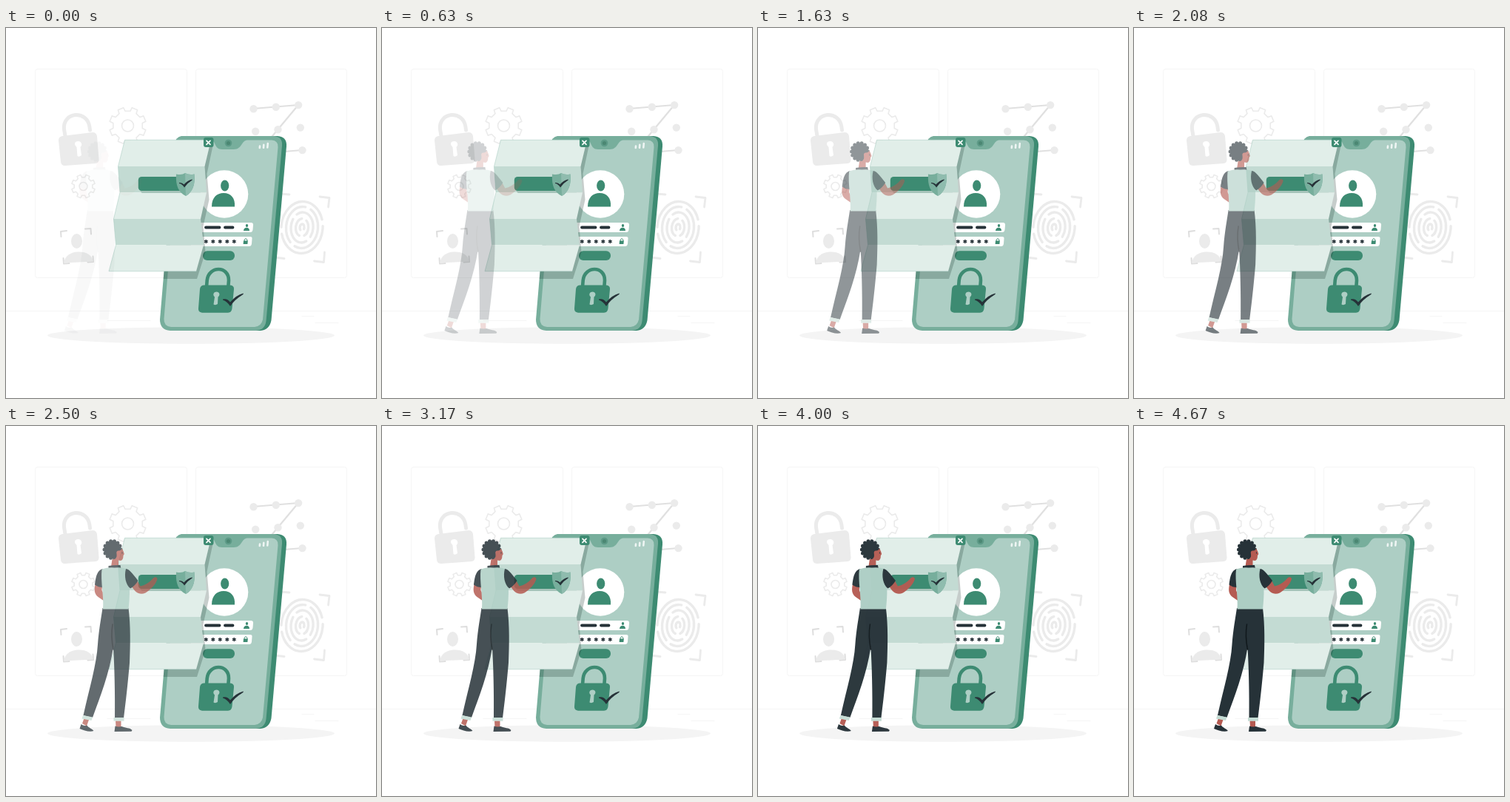
Recreate the animation shown at these times as an HTML page. Size 500 px wide and 500 px high, loop 4.71 s.

```html
<!DOCTYPE html>
<html lang="en">
<head>
<meta charset="utf-8">
<title>Secure login</title>
<style>
  html, body { margin: 0; width: 100%; height: 100%; overflow: hidden; background: #fff; }
  svg { display: block; width: 100%; height: 100%; }
  .line { fill: none; stroke-linecap: round; stroke-linejoin: round; }
  .dark { fill: #263238; }
  .green { fill: #3d8b72; }
  .mid { fill: #77ae9c; }
  .soft { fill: #adcec4; }
  .skin { fill: #b55b52; }
  .grey { fill: #ebebeb; }
</style>
</head>
<body>
<svg viewBox="0 0 500 500">
  <defs>
    <path id="face" d="M237 146H362Q374 147 373 159L351.500 396Q350 408 338 409H222Q208 408 208 394L228 158Q229 147 237 146Z"/>
    <clipPath id="onPhone"><use href="#face"/></clipPath>
  </defs>

  <g class="line" stroke="#f5f5f5">
    <rect x="39.500" y="55.500" width="205" height="282" rx="3"/>
    <rect x="256.500" y="55.500" width="204" height="282" rx="3"/>
    <path d="M0 382.500H500M400 389.500h16M418 398.500h31M137 395.500h58"/>
  </g>
  <ellipse cx="250" cy="415.500" rx="194" ry="11.300" fill="#f4f4f4"/>

  <!-- pale padlock and gears -->
  <path class="line" stroke="#ebebeb" stroke-width="5" d="M80 146L78.500 137C76 113 110 110 113 134L113.500 138"/>
  <path class="grey" d="M76 146L117 141Q122 141 123 146L125.500 177Q126 182 121 183L80 186Q75 186.500 74 181L71 152Q71 147 76 146Z"/>
  <path fill="#fff" d="M95.500 161C91 157 93 153 97.500 153C102 153 104 158 100.500 161L102 172Q99 175 96.500 173Z"/>
  <g id="gears" class="line" stroke="#ebebeb" stroke-width="1.600"></g>

  <!-- face scan -->
  <path class="line" stroke="#dedede" stroke-width="2" d="M74.500 282L74 275L82 274M107 271.500L114.500 271L115 278.500M77.500 311L78 318.500L85.500 318M110.500 316.500L118 316L117.500 308.500"/>
  <ellipse class="grey" cx="95.500" cy="288" rx="7.500" ry="10"/>
  <path class="grey" d="M78 317.500C80 307 88 303 97 302.500C108 302 116 306 118 315.500Z"/>

  <!-- unlock pattern -->
  <path class="line" stroke="#e0e0e0" stroke-width="2.200" d="M334 109L395 104L340 170L400 165"/>
  <g id="dots" class="grey"></g>

  <!-- fingerprint -->
  <g class="line" stroke="#ebebeb" stroke-width="2.800">
    <path d="M369 235L370 224L383 225M424 228L437 229.500L435.500 242M430.500 303L429.500 316.500L416.500 315M376 311.500L363 310"/>
    <g id="print" transform="rotate(5 400 270)" stroke-width="3.400"></g>
  </g>

  <!-- phone -->
  <path class="green" d="M243 146H367Q380 147 379 160L358.500 395Q356 408 344 409H225Z"/>
  <use href="#face" class="mid"/>
  <path class="soft" d="M240 151.500H277C284 152 281 164 292 164H308C319 164 318 152 326 151.500H359Q368 152 367.500 161L347 394Q345 403 336 404H223Q213 403 213.500 393L233 160Q234 152 240 151.500Z"/>
  <circle cx="300.500" cy="155.500" r="4.800" fill="#5d9a87"/>
  <circle cx="300.500" cy="155.500" r="2.600" fill="#4b8773"/>
  <path class="line" stroke="#eef5f3" stroke-width="2.600" d="M343 159.500l-.2 2.500M348.300 157.800l-.3 4M353.800 156l-.5 5.500"/>
  <circle cx="295" cy="224.500" r="32.300" fill="#fff"/>
  <ellipse class="green" cx="295.700" cy="213" rx="5.600" ry="7.500"/>
  <path class="green" d="M278 241.500C278 229 285 223 294 223C304 223 310 230 309 241.500Z"/>

  <path fill="#fff" d="M250 263H331Q334.500 263 334 266.500L333.500 272.500Q333 276 330 276H250ZM250 282H330Q333 282 332.500 285L332 291.500Q331.500 295 328.500 295H250Z"/>
  <path class="line" stroke="#263238" stroke-width="3.800" d="M270 269.500H288.500M296 269.500H306.500"/>
  <g id="stars" class="line" stroke="#263238" stroke-width="1.300"></g>
  <ellipse class="green" cx="325.500" cy="267" rx="1.700" ry="2"/>
  <path class="green" d="M321 274C321 269 329 268 329 274ZM321 287.500h5.800l-.4 4.500h-5.800Z"/>
  <path class="line" stroke="#3d8b72" d="M322 288C321.500 283.500 326.500 283.500 326 288"/>
  <rect class="green" x="266" y="301.300" width="43" height="12.700" rx="6"/>

  <path class="line" stroke="#3d8b72" stroke-width="4.600" d="M271 350L271.700 341C274 321 301 321 301 341L300.300 350"/>
  <path class="green" d="M267 347.500H303Q308.500 348 308 353L305.500 379Q305 384.500 300 384.700H265Q259.500 384 260 379L262 353Q262.500 348 267 347.500Z"/>
  <path class="soft" d="M282 363.500C278.500 360 281 356.500 284.500 356.500C288.500 356.500 290 361 286.500 363.500L286 373Q283 375 280.500 373.500Z"/>
  <path class="dark" d="M293 366.500Q299 365 303 370.500Q311 361 320.500 358.500Q321.500 359.500 319 361Q309 367 303 376Q299 369.500 293 367.500Z"/>

  <!-- unfolded paper -->
  <g clip-path="url(#onPhone)"><path fill="#1f3a32" opacity=".25" d="M164 161L280 157L271.500 197L274.500 232L266.500 268L269.500 303L258 339H143Z"/></g>
  <g id="paper" stroke-width=".6"></g>
  <rect class="green" x="267" y="148" width="13.500" height="13" rx="3"/>
  <path class="line" stroke="#fff" stroke-width="1.700" d="M271 152.300l5 5M276 152.300l-5 5"/>
  <path fill="#a5c3b9" d="M182 218H240L238 223H184Q181 222 182 218Z"/>
  <rect class="green" x="178.800" y="201" width="62" height="19" rx="4.500"/>
  <path class="mid" d="M242 196Q247 199 254.500 197.500C256 212 252 222 243 227C233 222 229 213 230 197.500Q238 199 242 196Z"/>
  <path fill="#8fbcae" d="M242 196Q247 199 254.500 197.500C256 212 252 222 243 227Z"/>
  <path class="dark" d="M234 209Q238 208.500 240.500 211.500Q245 206 251.500 204.500Q252.500 205 251 206Q245 209.500 241 215.500Q238 210.500 234 210Z"/>

  <!-- man -->
  <g id="man">
    <path class="skin" d="M129.500 212C127 222 128 227 133 231L141 236.500V226C137 223 137.500 220 139.500 216Z"/>
    <path class="skin" d="M111.500 402L114 395L120.500 397L117.500 405.500ZM156.500 398H164V407H157Z"/>
    <path class="dark" d="M110 403Q114 406 118 404.500C120 408 125 409 127 412C122 414 113 411.500 108 409ZM156 405.500Q160 407 165 406C170 408.500 176 407.500 179 411L178 412.700L155 413Z"/>
    <path class="dark" d="M139 246H174C177 270 176.500 295 175.500 320C173 350 170 375 167.500 395H155.500C156 360 155 325 153.500 299C148 335 136 365 125.500 394L113 391C121 355 131 322 132.500 295C134 275 137 260 139 246Z"/>
    <path class="line" stroke="#10181c" stroke-width="1.500" d="M152.500 268C150.500 280 151.500 292 153.500 302"/>
    <path fill="#c3dbd3" d="M112.500 391L125.500 393.500L124 398L111 395.500ZM154 394H168V398.700H154Z"/>
    <path class="dark" d="M140 193C131 194 129.500 206 128.500 214.500Q134 218.500 140 218Z"/>
    <g id="hair" class="dark"><ellipse cx="152.500" cy="167" rx="11.500" ry="11.500"/></g>
    <path class="skin" d="M160 168.500Q164 169 165 165.500Q167 168 168.300 173L167 175Q167 181 163.500 182L160.500 181.500V190H150.500L152 180Q159 181 158 173Q157 169 160 168.500Z"/>
    <path class="line" stroke="#263238" d="M165.500 171v1"/>
    <path class="dark" d="M147 189Q155 187.500 163 188L164 193H147Z"/>
    <path class="soft" d="M138 193.500Q147 190.500 155 191.500Q165 190.500 171 193C177 210 176 230 174 247.500H139.500C141 230 136 210 138 193.500Z"/>
    <path class="skin" d="M178 216L186 209L190 216.500C197 215 203 211 207 206C209 203.500 213 203.500 213 207C211 214 204 221 197 225.500C189 229 183 225 178 216Z"/>
    <path class="dark" d="M170.500 193C176 193.500 182 203 187 209Q183 216 176.500 219.500C170 214 168 203 170.500 193Z"/>
  </g>
</svg>
<script>
const LOOP = 4710, START = 80, SLIDE = 30;
const $ = id => document.getElementById(id);
const add = (id, markup) => $(id).insertAdjacentHTML('beforeend', markup);
const polar = (cx, cy, r, a) => `${cx + r * Math.cos(a)} ${cy + r * Math.sin(a)}`;

function gear(cx, cy, outer, root, hole) {
  const step = Math.PI / 4, points = [];
  for (let i = 0; i < 8; i++) {
    const a = (i + .5) * step;
    for (const [r, d] of [[root, -.22], [outer, -.16], [outer, .16], [root, .22]])
      points.push(polar(cx, cy, r, a + d));
  }
  add('gears', `<path d="M${points.join('L')}Z"/><circle cx="${cx}" cy="${cy}" r="${hole}"/>`);
}
gear(164.5, 132, 25, 20, 8);
gear(104.5, 214, 16, 12.5, 5.5);

for (let row = 0; row < 3; row++)
  for (let col = 0; col < 3; col++)
    add('dots', `<circle cx="${334.5 + col * 30.3 + row * 2.7}" cy="${109.3 - col * 2.6 + row * 30.5}" r="5.2"/>`);

// Each ridge: radii, dash and gap lengths
[[28, 35, 88, 9], [21.5, 28, 64, 8], [15, 20.5, 46, 8], [8.5, 12, 28, 7], [3, 4.5, 13, 6]]
  .forEach(([rx, ry, dash, gap], i) =>
    add('print', `<ellipse cx="400" cy="269.500" rx="${rx}" ry="${ry}" stroke-dasharray="${dash} ${gap}" stroke-dashoffset="${i * 17}"/>`));

for (let i = 0; i < 5; i++) {
  const x = 270.3 + i * 9.5;
  for (const a of [90, 30, -30])
    add('stars', `<path d="M${x - 2.2} 288.500h4.400" transform="rotate(${a} ${x} 288.500)"/>`);
}

const folds = [[160.5, 277, 151.3], [151.5, 268.5, 187], [154, 271, 222.3], [145.5, 263, 258], [148.5, 267, 293.3], [139, 257, 328.7]];
folds.slice(1).forEach(([left, right, y], i) => {
  const [l, r, top] = folds[i], fill = i % 2 ? '#c3dbd3' : '#e1eee9';
  add('paper', `<path fill="${fill}" d="M${l} ${top}H${r}L${right} ${y}H${left}Z"/>`);
});
add('paper', `<path class="line" stroke="#adcec4" d="M${folds[0][1]} ${folds[0][2]}${folds.map(f => `L${f[0]} ${f[2]}`).join('')}H257"/>`);

for (let i = 0; i < 14; i++) {
  const [x, y] = polar(0, 0, 11, i * Math.PI / 7).split(' ').map(Number);
  add('hair', `<circle cx="${152.5 + x}" cy="${167 + y * 1.05}" r="2.500"/>`);
}

// Cubic Bezier (0, 0, .58, 1)
function easeOut(x) {
  let low = 0, high = 1;
  for (let i = 0; i < 24; i++) {
    const s = (low + high) / 2;
    if (1.74 * s * s - .74 * s ** 3 < x) low = s; else high = s;
  }
  return 3 * low * low - 2 * low ** 3;
}

const man = $('man');
function draw(now) {
  const t = now % LOOP;
  const p = easeOut((t < 170 ? START : t) / LOOP);
  man.setAttribute('opacity', p);
  man.setAttribute('transform', `translate(${SLIDE * (p - 1)} 0)`);
  requestAnimationFrame(draw);
}
draw(0);
</script>
</body>
</html>
```
